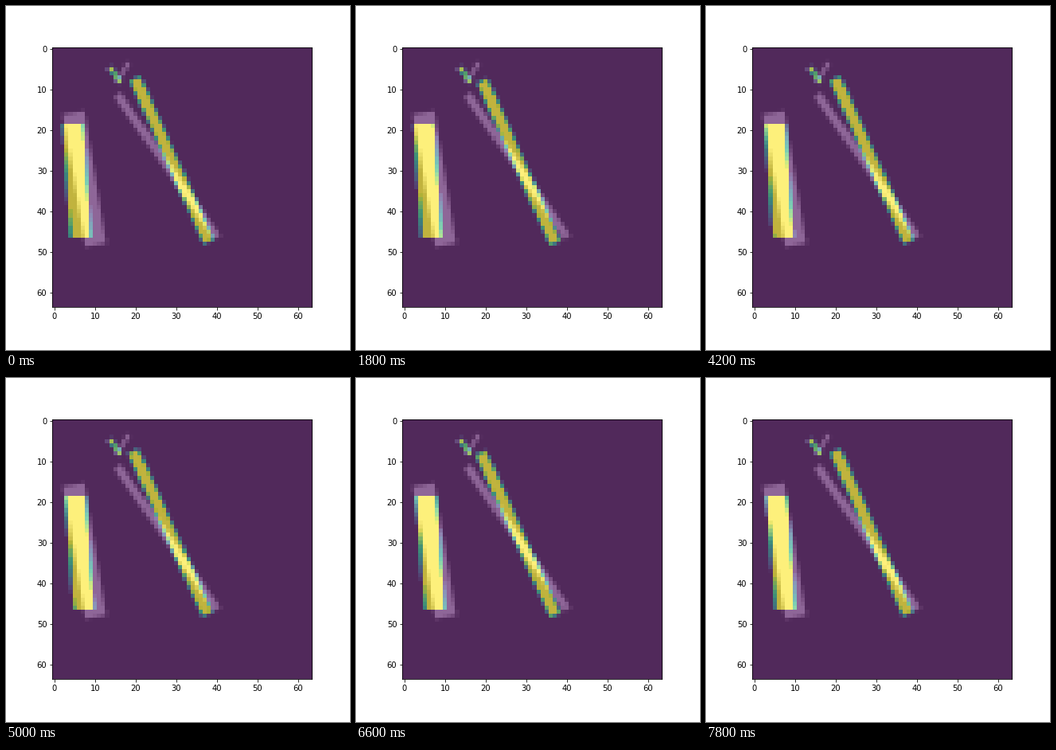
These frames come from a looping animation (432 px wide and 432 px high, 8 s). A matplotlib script:

```python
import numpy as np
import matplotlib.pyplot as plt
from matplotlib.animation import FuncAnimation

N = 64          # cells per side
SUB = 8         # samples per cell and axis
FRAMES = 40
SWAY = 21       # steps in one sway of the long bar

grid = (np.arange(N * SUB) + 0.5) / SUB - 0.5
X, Y = np.meshgrid(grid, grid)


def cover(points):
    """Share of each cell that lies inside a convex polygon."""
    pts = np.asarray(points, float)
    nxt = np.roll(pts, -1, axis=0)
    area = np.sum(pts[:, 0] * nxt[:, 1] - nxt[:, 0] * pts[:, 1])
    inside = np.ones(X.shape, bool)
    for (x0, y0), (x1, y1) in zip(pts, nxt):
        side = (x1 - x0) * (Y - y0) - (y1 - y0) * (X - x0)
        inside &= side * np.sign(area) >= 0
    return inside.reshape(N, SUB, N, SUB).mean(axis=(1, 3))


def bar(x0, y0, x1, y1, width):
    """Coverage of a straight bar with square ends."""
    a, b = np.array([x0, y0]), np.array([x1, y1])
    d = (b - a) / np.hypot(*(b - a))
    n = np.array([-d[1], d[0]]) * width / 2
    return cover([a + n, b + n, b - n, a - n])


def slab(x0, y0, x1, y1, width):
    """Coverage of a leaning bar with level ends."""
    h = width / 2
    return cover([(x0 - h, y0), (x0 + h, y0), (x1 + h, y1), (x1 - h, y1)])


def long_bar(i):
    """Sways about its middle; the top also wobbles at twice the rate."""
    turn = 2 * np.pi * i / SWAY
    swing, wobble = np.cos(turn), np.sin(2 * turn)
    return bar(19.4 + 0.45 * swing - 0.25 * wobble, 7.6 - 0.3 * swing,
               37.55 + 0.45 * swing, 47.7 - 0.2 * swing, 2.8)


def wide_bar(i):
    """Drifts slowly to the right."""
    s = i / (FRAMES - 1)
    return slab(4.63 + 0.95 * s, 18.5, 6.55 + 1.15 * s, 46.5, 5.05)


def drawn(i):
    mark = bar(13.6, 4.5, 16.3, 8.4, 0.95)
    return np.clip(long_bar(i) + wide_bar(i) + mark, 0, 1)


goal = bar(4.75, 15.7, 10.2, 48.35, 5.3)
goal = goal + bar(15.5, 11.3, 40.1, 46.4, 2.0)
goal = goal + bar(18.3, 3.5, 15.2, 8.2, 0.95)
goal = goal + 0.3 * bar(12.6, 5.0, 14.4, 5.0, 0.9)
goal = np.clip(goal, 0, 1)

fig, ax = plt.subplots(figsize=(6, 6), dpi=72, facecolor="white")
fig.subplots_adjust(left=0.125, right=0.9, bottom=0.125, top=0.88)
image = ax.imshow(drawn(0), cmap="viridis", vmin=0, vmax=1,
                  interpolation="nearest")
ax.imshow(goal, cmap="gray", vmin=-0.68, vmax=1, alpha=0.4,
          interpolation="nearest")
ax.set_xticks(range(0, N, 10))
ax.set_yticks(range(0, N, 10))


def update(i):
    image.set_data(drawn(i))
    return [image]


anim = FuncAnimation(fig, update, frames=FRAMES, interval=200,
                     repeat=True, repeat_delay=0, blit=False)
plt.show()
```
